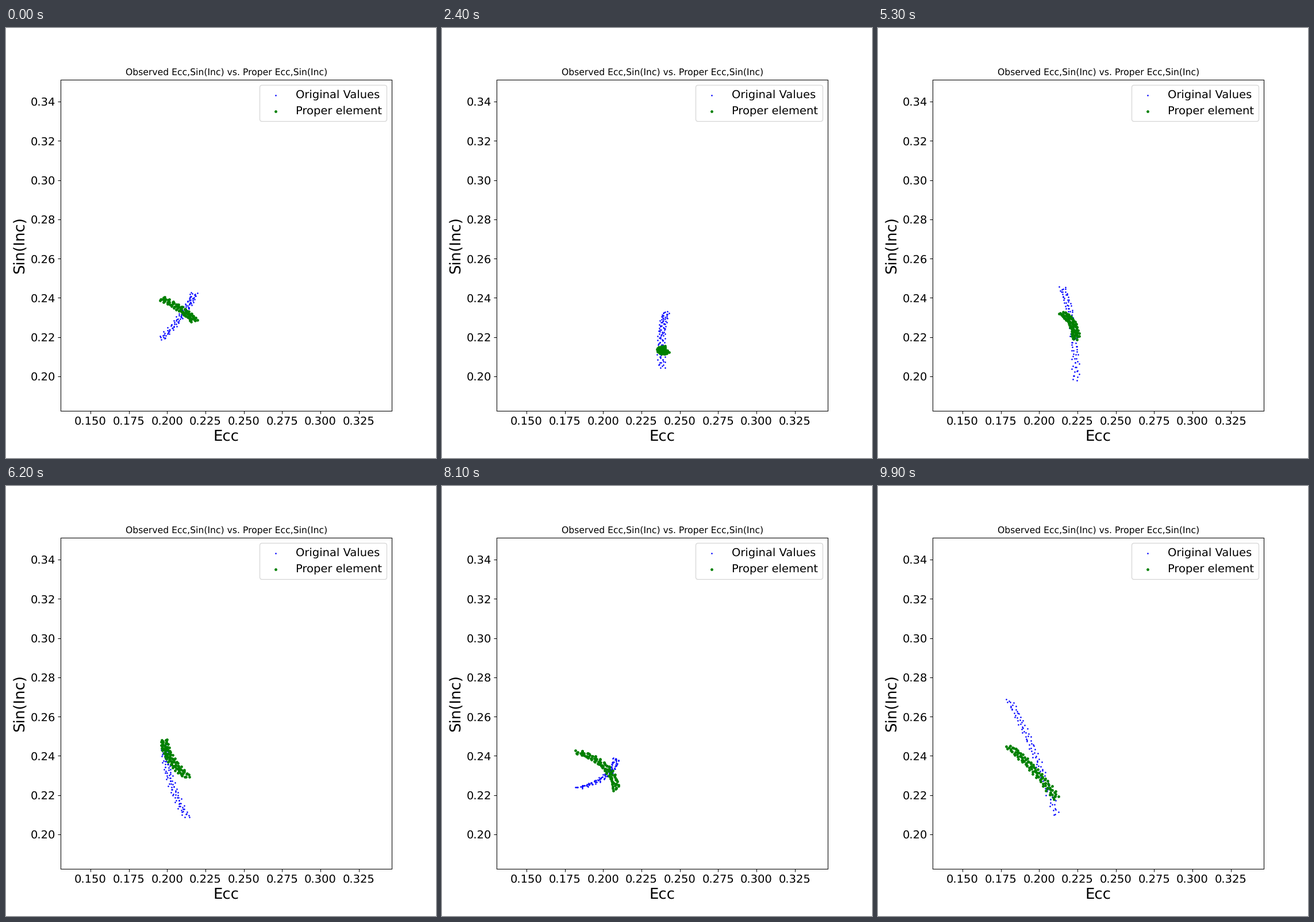
These frames come from a looping animation (748 by 748 pixels, 10 s). A matplotlib script:

```python
import numpy as np
import matplotlib.pyplot as plt
from matplotlib.animation import FuncAnimation

FRAMES, INTERVAL, POINTS = 100, 100, 100
TITLE = "Observed Ecc,Sin(Inc) vs. Proper Ecc,Sin(Inc)"

# Key poses in pixels: frame -> start, middle and end of the observed arc,
# then the heights at which the proper arc starts and ends
POSES = {
    0: [(270, 541), (307, 498), (327, 461), (470, 509)],
    9: [(246, 539), (257, 536), (303, 524), (455, 484)],
    24: [(390, 494), (382, 534), (383, 591), (565, 555)],
    53: [(320, 451), (338, 519), (344, 612), (495, 540)],
    70: [(297, 517), (302, 580), (351, 620), (470, 551)],
    81: [(235, 525), (283, 505), (303, 473), (462, 528)],
    99: [(228, 372), (271, 462), (310, 572), (453, 543)],
}


def pose_at(frame):
    """Blended pose, and how far the frame lies between its two key poses."""
    times = list(POSES)
    i = min(np.searchsorted(times, frame, side="right") - 1, len(times) - 2)
    a, b = times[i], times[i + 1]
    f = (frame - a) / (b - a)
    return (1 - f) * np.array(POSES[a]) + f * np.array(POSES[b]), f


def drift(frame, f):
    """Epicycle between poses, plus one long plunge below the axes."""
    plunge = np.exp(-((frame - 39) / 8) ** 4)
    swing = np.sin(np.pi * f) * (1 - plunge)
    return (110 * plunge + 45 * swing * np.sin(frame),
            210 * plunge - 60 * swing * np.cos(frame))


def to_data(x, y):
    return np.column_stack([0.15 + (x - 147) / 2668.6, 0.2 + (606 - y) / 3414])


def cloud(frame):
    """Observed and proper points for one frame."""
    (start, mid, end, (top, bottom)), f = pose_at(frame)
    u = np.linspace(0, 1, POINTS)
    x, y = (a * (1 - u) * (1 - 2 * u) + 4 * m * u * (1 - u) + b * u * (2 * u - 1)
            for a, m, b in zip(start, mid, end))
    y_proper = top + (bottom - top) * (y - start[1]) / (end[1] - start[1])

    dx, dy = drift(frame, f)
    n = np.arange(POINTS) + 7 * frame
    x = x + dx + 5 * np.sin(2.3 * n) + 2 * np.sin(0.83 * n)
    y = y + dy + 1.2 * np.cos(1.7 * n)
    y_proper = y_proper + dy + 2.5 * np.cos(2.3 * n + 0.6)
    return to_data(x, y), to_data(x, y_proper)


plt.rcParams["font.family"] = "DejaVu Sans"
plt.rcParams["text.hinting"] = "none"
fig, ax = plt.subplots(figsize=(8, 8), dpi=93.5)
ax.set_box_aspect(1)
ax.set_title(TITLE, fontsize=12)
ax.set_xlabel("Ecc", fontsize=20)
ax.set_ylabel("Sin(Inc)", fontsize=20)
ax.tick_params(labelsize=15)
ax.set_xticks(np.linspace(0.15, 0.325, 8))
ax.set_yticks(np.linspace(0.2, 0.34, 8))
ax.set_xlim(0.1307, 0.3466)
ax.set_ylim(0.1825, 0.3512)

observed = ax.scatter([], [], s=1, c="blue", label="Original Values")
proper = ax.scatter([], [], s=7, c="green", label="Proper element")
ax.legend(loc="upper right", fontsize=15)


def update(frame):
    for dots, points in zip((observed, proper), cloud(frame)):
        dots.set_offsets(points)
    return observed, proper


anim = FuncAnimation(fig, update, frames=FRAMES, interval=INTERVAL,
                     repeat=True, repeat_delay=0)
plt.show()
```
